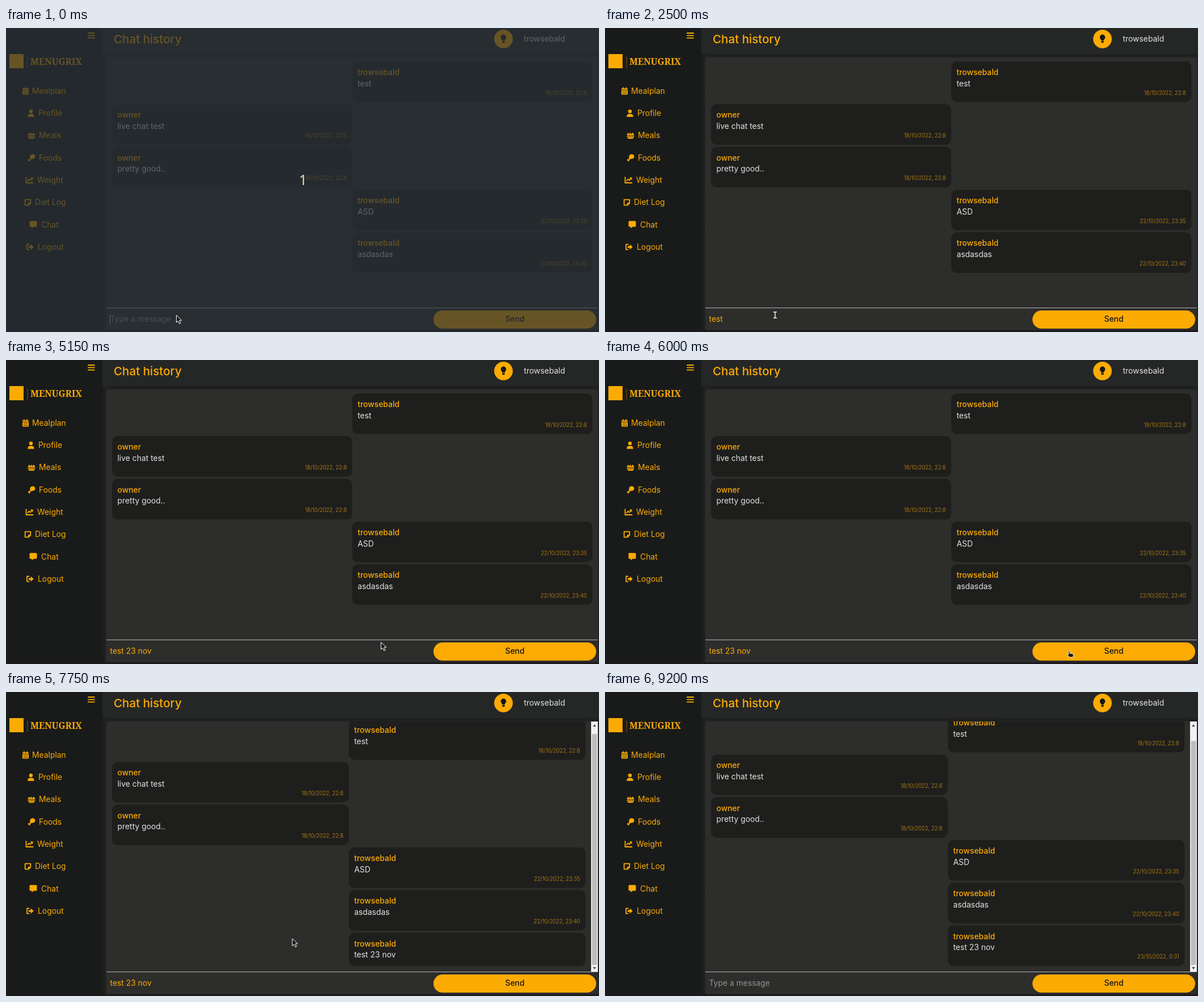
Recreate the animation shown at these times as an HTML page. Size 1046 by 536 pixels, loop 9250 ms.

```html
<!DOCTYPE html>
<html lang="en">
<head>
<meta charset="utf-8">
<title>Chat history</title>
<style>
  html, body { margin: 0; width: 100%; height: 100%; overflow: hidden; background: #222322; }
  svg { display: block; width: 100vw; height: 100vh; }
  text { font: 400 13.9px Inter, "Open Sans", sans-serif; white-space: pre; }
  .gold { fill: #fcab03; }
  .line { fill: none; stroke: #fcab03; stroke-width: 1.8; stroke-linejoin: round; stroke-linecap: round; }
  .pale { fill: #e2e2e2; }
  .mid { font-weight: 500; }
  .date { font-size: 9.7px; letter-spacing: -.02em; fill: #a37410; text-anchor: end; }
  .title { font-size: 20.6px; font-weight: 500; }
  .brand { font: 800 15.8px "Noto Serif", serif; }
  .count { font: 400 25px "Noto Sans", sans-serif; fill: #e6dfbd; text-anchor: middle; }
</style>
</head>
<body>
<svg viewBox="0 0 1046 536" preserveAspectRatio="none">
  <defs>
    <clipPath id="view"><rect x="177" y="52" width="867" height="441"/></clipPath>
    <linearGradient id="edge"><stop stop-color="#1a1b1b"/><stop offset="1" stop-color="#222322"/></linearGradient>
    <linearGradient id="shade" x2="0" y2="1"><stop stop-color="#1c1d1d"/><stop offset="1" stop-color="#222322"/></linearGradient>
  </defs>
  <rect width="1046" height="536" fill="#222322"/>
  <rect x="170" width="876" height="46" fill="#252726"/>
  <rect x="170" y="46" width="876" height="6" fill="url(#shade)"/>
  <rect width="170" height="536" fill="#191b1a"/>
  <rect x="170" y="46" width="7" height="490" fill="url(#edge)"/>
  <path d="M177 533V57q0-5 5-5H1039q5 0 5 5V533Z" fill="#2d2d2c"/>
  <rect y="533" width="1046" height="3" fill="#1c181b"/>

  <path class="line" stroke-linecap="butt" d="M145 9h11M145 13.3h11M145 17.6h11"/>
  <rect class="gold" x="6" y="46" width="25" height="25"/>
  <path d="M38 50V70" stroke="#795613"/>
  <text class="gold brand" x="43" y="64.5">MENUGRIX</text>
  <g id="menu"></g>

  <text class="gold title" x="190" y="26.7">Chat history</text>
  <circle class="gold" cx="877.5" cy="19.3" r="16.4"/>
  <path d="M875.2 22.2q0-1.4-1.2-2.6a4.8 4.8 0 1 1 7 0q-1.2 1.2-1.2 2.6ZM875.2 23.2h4.6v1.6q0 1.4-2.3 1.4t-2.3-1.4Z" fill="#161616"/>
  <text class="pale" x="913.5" y="24">trowsebald</text>

  <g clip-path="url(#view)"><g id="cards"></g></g>
  <g id="bar">
    <rect x="1032" y="52" width="12" height="441" fill="#f1f1f1"/>
    <path d="M1035 61l3-4 3 4ZM1035 485l3 4 3-4Z" fill="#505050"/>
    <rect id="thumb" x="1033.5" width="9" fill="#bdbdbd"/>
  </g>
  <path d="M177 493.5H1044" stroke="#b3b3b3"/>
  <text id="input" x="183.5" y="518.3"></text>
  <path id="caret" d="M0 505V523" stroke="#dcdcdc"/>
  <rect class="gold" x="754" y="498" width="287" height="32" rx="16"/>
  <text class="mid" x="897.5" y="518.3" text-anchor="middle" fill="#141414">Send</text>

  <g id="veil">
    <rect width="1046" height="536" fill="#282f36" opacity=".7"/>
    <text class="count" x="524" y="277">1</text>
  </g>
  <g id="mouse" fill="#161616" stroke="#fff" stroke-linejoin="round">
    <path id="arrow" d="M.5.5V13.2l3.1-2.7 2.2 4.9 2.2-1-2.1-4.8 3.9-.2Z"/>
    <path id="beam" fill="none" stroke-width="1.4" d="M-3-5.2h2.2L0-4.6.8-5.2H3M-3 5.2h2.2L0 4.6.8 5.2H3M0-4.6V4.6"/>
    <path id="hand" stroke-width=".9" d="M.5 1.2q1.2-1.4 2.3 0V5l5 1q1.8.5 1.5 2.4L8.4 12H2.6L-1.6 8.1q-.3-1.6 2.1-.6Z"/>
  </g>
</svg>
<script>
const LOOP = 9250, STEP = 50;
const $ = id => document.getElementById(id);
const show = (id, on) => $(id).setAttribute('display', on ? 'inline' : 'none');
const text = (cls, x, y, s) => `<text class="${cls}" x="${x}" y="${y}">${s}</text>`;
const gold = d => `<path class="gold" fill-rule="evenodd" d="${d}"/>`;
const line = d => `<path class="line" d="${d}"/>`;

// label, icon centre, label start, icon
const menu = [
  ['Mealplan', 34.5, 46, gold('M-5.5-4.5h2V-6.5h1.8v2H1.7v-2H3.5v2h2v2.3h-11ZM-5.5-1.2h11V5.2q0 1.3-1.3 1.3H-4.2q-1.3 0-1.3-1.3ZM-3.5.8v1.3h1.6V.8ZM-.8.8v1.3H.8V.8ZM1.9.8v1.3h1.6V.8ZM-3.5 3.6v1.3h1.6V3.6ZM-.8 3.6v1.3H.8V3.6ZM1.9 3.6v1.3h1.6V3.6Z')],
  ['Profile', 44, 57, gold('M0-6.5a3.2 3.2 0 1 1 0 6.4a3.2 3.2 0 1 1 0-6.4ZM-5.7 6.5q0-5.3 4.3-5.3H1.4q4.3 0 4.3 5.3Z')],
  ['Meals', 45, 58, gold('M-6.2-.3q-.2-3 2.4-4.9l1.6 3.4L-.6-5.6l1.8 3.8L3.3-5.2q3 1.8 2.9 4.9ZM-6.5.6h13v1.6h-13ZM-5.8 3H5.8q-.4 2.6-2.4 2.6H-3.4Q-5.4 5.6-5.8 3Z')],
  ['Foods', 45, 58, gold('M-2.7-1.3q0-5 4.5-5.2 4.6.2 4.6 4.2 0 4.6-5.6 4.2L-2.5 3.6q1 2.4-1 2.7-1.1 0-1.4-1.1-1.5-.3-1.4-1.7.5-1.9 2.7-.8l1-1.6Z')],
  ['Weight', 41.5, 55, line('M-6-5V4.8H6M-3.3 1.2L-.7-1.6 1.5.4 5-3.7M2.7-3.9H5.2V-1.5')],
  ['Diet Log', 38.5, 51, line('M-4.8-4.8H4.8V1.3L1.3 4.8H-4.8ZM1.3 4.8V1.3H4.8')],
  ['Chat', 48, 62, gold('M-6.5-5q0-1.5 1.5-1.5H5q1.5 0 1.5 1.5V2.2Q6.5 3.7 5 3.7H1L-2.6 6.5V3.7H-5q-1.5 0-1.5-1.5Z')],
  ['Logout', 42.5, 56, line('M-2-4.6H-5.4V4.6H-2') + gold('M-2.6-1.6H1.3V-4.6L6.3 0 1.3 4.6V1.6H-2.6Z')],
];
$('menu').innerHTML = menu.map(([label, ix, x, icon], i) => {
  const y = 111 + 39.3 * i;
  return `<g transform="translate(${ix} ${y})">${icon}</g>` + text('gold', x, y + 4.8, label);
}).join('');

const messages = [
  [1, 'test', '18/10/2022, 22:8'],
  [0, 'live chat test', '18/10/2022, 22:8'],
  [0, 'pretty good..', '18/10/2022, 22:8'],
  [1, 'ASD', '22/10/2022, 23:35'],
  [1, 'asdasdas', '22/10/2022, 23:40'],
  [1, 'test 23 nov', '23/10/2022, 0:31'],
];
function cards(sent, dated) {
  const w = sent ? 417.7 : 423.7;
  return messages.slice(0, sent ? 6 : 5).map(([mine, body, date], i) => {
    const x = 187 + mine * w, y = 59 + 75.3 * i, stamped = i < 5 || dated;
    return `<rect x="${x}" y="${y}" width="${w}" height="${stamped ? 71.5 : 59}" rx="10" fill="#1e1e1d"/>` +
      text('gold mid', x + 9.5, y + 24, mine ? 'trowsebald' : 'owner') +
      text('pale', x + 9.5, y + 43.6, body) +
      (stamped ? text('date', x + w - 9.7, y + 58.8, date) : '');
  }).join('');
}

// time at which each character of the typed line appears
const keys = [950, 1150, 1350, 1650, 1900, 3200, 3500, 3750, 3950, 4100, 4200];
const SENT = 6250, REPLY = 9100;

// start, end, control point, end point
const moves = [
  [4650, 5600, 740, 486, 811, 510],
  [5600, 5700, 814, 511, 817, 512],
  [7050, 7900, 570, 450, 462, 424],
  [8150, 8500, 260, 245, 149, 143],
  [8600, 8650, 145, 139, 141, 136],
  [8700, 9050, 70, 67, -16, -18],
];
function mouseAt(t) {
  let x = 300, y = 506;
  for (const [from, to, cx, cy, ex, ey] of moves) {
    if (t <= from) break;
    const u = Math.min(1, (t - from) / (to - from)), v = 1 - u;
    x = v * v * x + 2 * u * v * cx + u * u * ex;
    y = v * v * y + 2 * u * v * cy + u * u * ey;
  }
  return [x, y];
}

let lastCards = '';
function draw(t) {
  const sent = t >= SENT, replied = t >= REPLY;

  const key = `${sent} ${replied}`;
  if (key !== lastCards) {
    $('cards').innerHTML = cards(sent, replied);
    lastCards = key;
  }
  const scroll = replied ? 24 : t >= SENT + STEP ? 11 : 0;
  $('cards').setAttribute('transform', `translate(0 ${-scroll})`);
  show('bar', sent);
  $('thumb').setAttribute('y', 64 + scroll * .93);
  $('thumb').setAttribute('height', replied ? 395 : 407);

  const typed = replied ? '' : 'test 23 nov'.slice(0, keys.filter(k => t >= k).length);
  const input = $('input');
  input.textContent = typed || 'Type a message';
  input.setAttribute('fill', typed ? '#fcab03' : '#929292');
  const caretX = 183.5 + (typed ? input.getComputedTextLength() : 0);
  $('caret').setAttribute('transform', `translate(${caretX} 0)`);
  show('caret', t < 300 || (t >= 950 && t < 2500) || (t >= 3100 && t < 4800));

  const [x, y] = mouseAt(t);
  const kind = t < 50 ? 'arrow'
    : x > 756 && y > 498 ? 'hand'
    : x > 183 && x < 754 && y > 500 ? 'beam' : 'arrow';
  for (const k of ['arrow', 'beam', 'hand']) show(k, k === kind);
  $('mouse').setAttribute('transform', `translate(${x} ${y})`);
  show('veil', t < 50);
}

const start = performance.now();
function tick() {
  const t = (performance.now() - start) % LOOP;
  draw(Math.floor(t / STEP) * STEP);
  requestAnimationFrame(tick);
}
tick();
</script>
</body>
</html>
```
